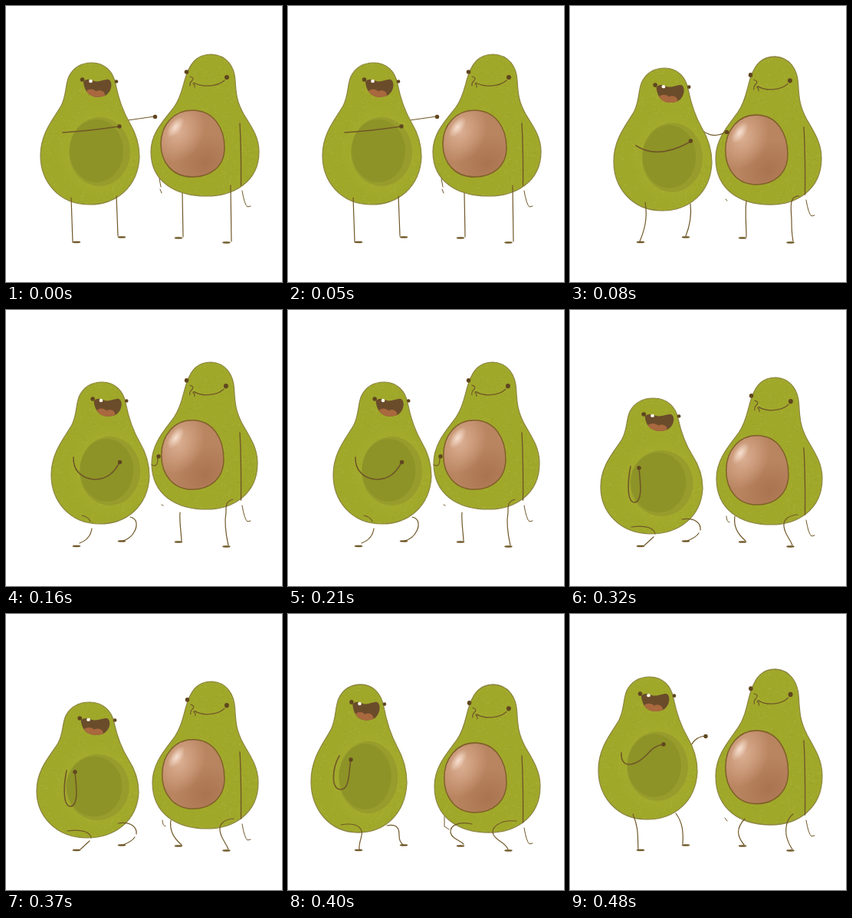
Recreate the animation shown at these times as an HTML page with a canvas. Size 360x360 px, loop 0.56 s.

```html
<!DOCTYPE html>
<html lang="en">
<head>
<meta charset="utf-8">
<title>Two avocados</title>
<style>
html, body { margin: 0; width: 100%; height: 100%; overflow: hidden; background: #fff; }
canvas { display: block; width: 360px; height: 360px; }
</style>
</head>
<body>
<canvas id="stage" width="360" height="360"></canvas>
<script>
const ctx = document.getElementById('stage').getContext('2d');
const INK = '#705828', DARK = '#60461f', STEP = 80;

const dancer = {
  home: [45, 74, 129, 185],
  body: new Path2D('M112 74C129 74 140 86 143 102C147 122 153 138 161 152C170 167 174 180 174 197C172 237 143 259 109 259C68 259 45 228 45 195C45 165 63 146 72 130C79 116 77 104 82 92C88 80 99 74 112 74Z'),
  eyes: [[99.5, 96, 2.8], [144, 98.5, 2.3]],
  face: dancerFace
};
const friend = {
  home: [189, 63, 141, 185],
  body: new Path2D('M268 63C288 64 298 79 299 97C300 115 301 125 310 141C322 160 330 172 330 190C330 230 296 248 262 248C222 248 189 230 189 190C189 165 207 148 219 132C230 117 231 100 236 88C242 72 251 63 268 63Z'),
  eyes: [[235.5, 86, 2.8], [288, 93, 3]],
  face: friendFace
};
const mouth = new Path2D('M101 99C104 94 111 96 115 98C121 100 130 95 134 96C140 99 138 113 129 117C118 121 103 119 101 99Z');
const seed = new Path2D('M243 136C270 136 285 158 285 185C285 210 266 223 243 223C218 223 202 205 202 180C202 154 220 136 243 136Z');

// Boxes are x, y, width, height; hands mark the tips of the arms.
const poses = [
  { left: [45, 74, 129, 185], right: [189, 63, 141, 185],
    legs: 'M85 250L87 308M144 248L146 300M230 244L231 301M293 234L294 307',
    arm: 'M74 165Q108 163 148 157', far: 'M152 150L194 144',
    hands: [[148, 157], [194.5, 144.5]], shoulder: 153, wrist: 262, stub: 'M200 225L202 236M201 239L203 244' },
  { left: [57, 81, 128, 186], right: [190, 66, 138, 193],
    legs: 'M98 256C102 278 96 295 91 307M157 258C159 275 155 290 151 300M230 254C228 270 230 285 230 301M299 248C284 247 289 268 289 280Q289 296 291 307',
    arm: 'M86 182C105 195 130 192 157 177', far: 'M165 153C175 170 190 172 204 164',
    hands: [[157.5, 176], [204.5, 164.5]], shoulder: 158, wrist: 274, stub: 'M203 252L205 254' },
  { left: [59, 94, 128, 185], right: [190, 68, 138, 192],
    legs: 'M99 268Q108 270 110 276M112 285Q110 299 96 304M162 270C172 272 171 282 168 288C164 296 157 300 152 301M227 264C226 275 228 285 229 301M296 247C286 250 287 256 287 264Q284 280 290 307',
    arm: 'M88 192C87 210 100 220 115 221C132 221 141 212 148 199', far: 'M190 202C198 206 198 198 198 191',
    hands: [[148.5, 198.5], [199, 191]], shoulder: 160, wrist: 276, stub: 'M203 254L205 255' },
  { left: [55, 114, 134, 176], right: [191, 77, 138, 192],
    legs: 'M97 281C114 277 120 286 116 292C112 300 103 304 98 307M162 279C180 277 181 287 175 293C168 300 158 300 152 301M228 263C220 275 222 285 229 300M293 255C282 262 281 275 283 285C285 295 289 300 291 307',
    arm: 'M90 202C88 222 96 243 110 244C124 243 123 222 121 205', far: 'M186 217L190 219',
    hands: [[121, 205], [190.5, 219]], shoulder: 167, wrist: 284, stub: 'M203 262L205 264' },
  { left: [40, 115, 133, 177], right: [191, 88, 138, 192],
    legs: 'M80 283C100 280 110 285 111 292M109 296L97 307M146 273C165 270 171 280 170 287M168 291Q164 297 153 301M215 269C213 282 218 292 229 301M297 267C283 268 278 275 279 282C280 293 287 298 290 307',
    arm: 'M79 204C75 225 74 250 84 251C95 250 92 225 90 207', far: '',
    hands: [[90, 206]], shoulder: 180, wrist: 295, stub: 'M204 269Q204 276 208 277' },
  { left: [30, 92, 125, 193], right: [191, 92, 138, 193],
    legs: 'M69 275C85 272 94 276 96 283C98 290 92 296 93 307M129 276C145 273 145 283 145 289Q145 297 150 301M240 274C222 270 211 276 212 285C214 293 222 294 229 300M298 270C275 268 264 279 268 288C273 297 283 297 287 307',
    arm: 'M67 185C58 200 55 229 69 229C81 228 79 205 82 190', far: '',
    hands: [[82, 190]], shoulder: 185, wrist: 300, stub: 'M204 264L204 277L210 281' },
  { left: [37, 82, 129, 186], right: [190, 72, 139, 203],
    legs: 'M82 261C90 280 88 290 89 308M138 260C147 272 148 285 147 300M228 267C216 280 218 290 227 301M291 261C282 268 281 278 282 288Q284 298 290 307',
    arm: 'M67 181C66 195 74 200 88 193C103 185 105 172 122 170', far: 'M157 173C162 163 168 160 177 159',
    hands: [[122, 170], [177, 159.5]], shoulder: 165, wrist: 290, stub: 'M202 266L205 270' }
];
const feet = [[92, 308], [151, 301.5], [225, 302.5], [287.5, 308.5]];

function fill(path, color) { ctx.fillStyle = color; ctx.fill(path); }

function line(path, width = 1.4, color = INK) {
  ctx.lineWidth = width;
  ctx.strokeStyle = color;
  ctx.stroke(typeof path === 'string' ? new Path2D(path) : path);
}

function oval(x, y, rx, ry, color) {
  ctx.beginPath();
  ctx.ellipse(x, y, rx, ry, 0, 0, 7);
  ctx.fillStyle = color;
  ctx.fill();
}

function soft(x, y, rx, ry, turn, inner, outer) {
  ctx.save();
  ctx.translate(x, y);
  ctx.rotate(turn);
  ctx.scale(rx, ry);
  const glow = ctx.createRadialGradient(0, 0, 0, 0, 0, 1);
  glow.addColorStop(0, inner);
  glow.addColorStop(1, outer);
  oval(0, 0, 1, 1, glow);
  ctx.restore();
}

function speckle([x, y, w, h]) {
  let s = 7;
  const rand = () => (s = s * 16807 % 2147483647) / 2147483647;
  for (let i = 0; i < 600; i++) {
    ctx.fillStyle = i % 3 ? 'rgba(196,200,92,.35)' : 'rgba(128,132,24,.25)';
    ctx.fillRect(x + rand() * w, y + rand() * h, 1.4, 1.1);
  }
}

function dancerFace() {
  soft(122.5, 190, 56, 62, 0, 'rgba(174,180,52,.7)', 'rgba(174,180,52,0)');
  oval(122, 190, 40, 45, '#979c2c');
  oval(118, 189, 35, 41, '#8d9327');
  fill(mouth, '#6a4c2b');
  ctx.save();
  ctx.clip(mouth);
  oval(111, 115, 8, 6.5, '#a9683e');
  oval(122, 116, 7, 6, '#a9683e');
  ctx.restore();
  oval(110.5, 98, 2.4, 2.2, '#fff8e8');
}

function friendFace() {
  fill(seed, '#b98460');
  ctx.save();
  ctx.clip(seed);
  soft(260, 205, 44, 36, -.5, 'rgba(158,102,66,.55)', 'rgba(158,102,66,0)');
  soft(225, 164, 33, 42, .5, 'rgba(222,178,150,.95)', 'rgba(222,178,150,0)');
  soft(221, 158, 8, 16, .65, 'rgba(250,230,216,.9)', 'rgba(250,230,216,0)');
  ctx.restore();
  line(seed, 1.5, '#80602a');
  line('M245 100C255 106 275 106 285 97M240 92Q247 94 242 98Q239 101 240 104M244 101Q247 103 246 106', 1.2);
}

function drawAvocado(who, [x, y, w, h]) {
  const [hx, hy, hw, hh] = who.home;
  ctx.save();
  ctx.translate(x, y);
  ctx.scale(w / hw, h / hh);
  ctx.translate(-hx, -hy);
  fill(who.body, '#a0a82a');
  ctx.save();
  ctx.clip(who.body);
  speckle(who.home);
  ctx.restore();
  line(who.body, 1.2, '#8c8440');
  who.face();
  for (const [ex, ey, r] of who.eyes) oval(ex, ey, r, r, DARK);
  ctx.restore();
}

function draw(pose) {
  const { shoulder, wrist } = pose;
  ctx.fillStyle = '#fff';
  ctx.fillRect(0, 0, 360, 360);
  ctx.lineCap = ctx.lineJoin = 'round';
  drawAvocado(friend, pose.right);
  line(`M305 ${shoulder}Q307 ${shoulder + 35} 306.5 ${wrist - 28}`);
  line(`M308 ${wrist - 21}Q311 ${wrist - 3} 315 ${wrist}L319 ${wrist - 1}`, 1);
  line(pose.stub, 1);
  line(pose.far, 1.2);
  drawAvocado(dancer, pose.left);
  line(pose.legs, 1.2);
  for (const [x, y] of feet) oval(x, y, 5.3, 1.3, INK);
  line(pose.arm, 1.6);
  for (const [x, y] of pose.hands) oval(x, y, 2.7, 2.7, DARK);
}

function tick() {
  draw(poses[Math.floor(performance.now() / STEP) % poses.length]);
  requestAnimationFrame(tick);
}
tick();
</script>
</body>
</html>
```
